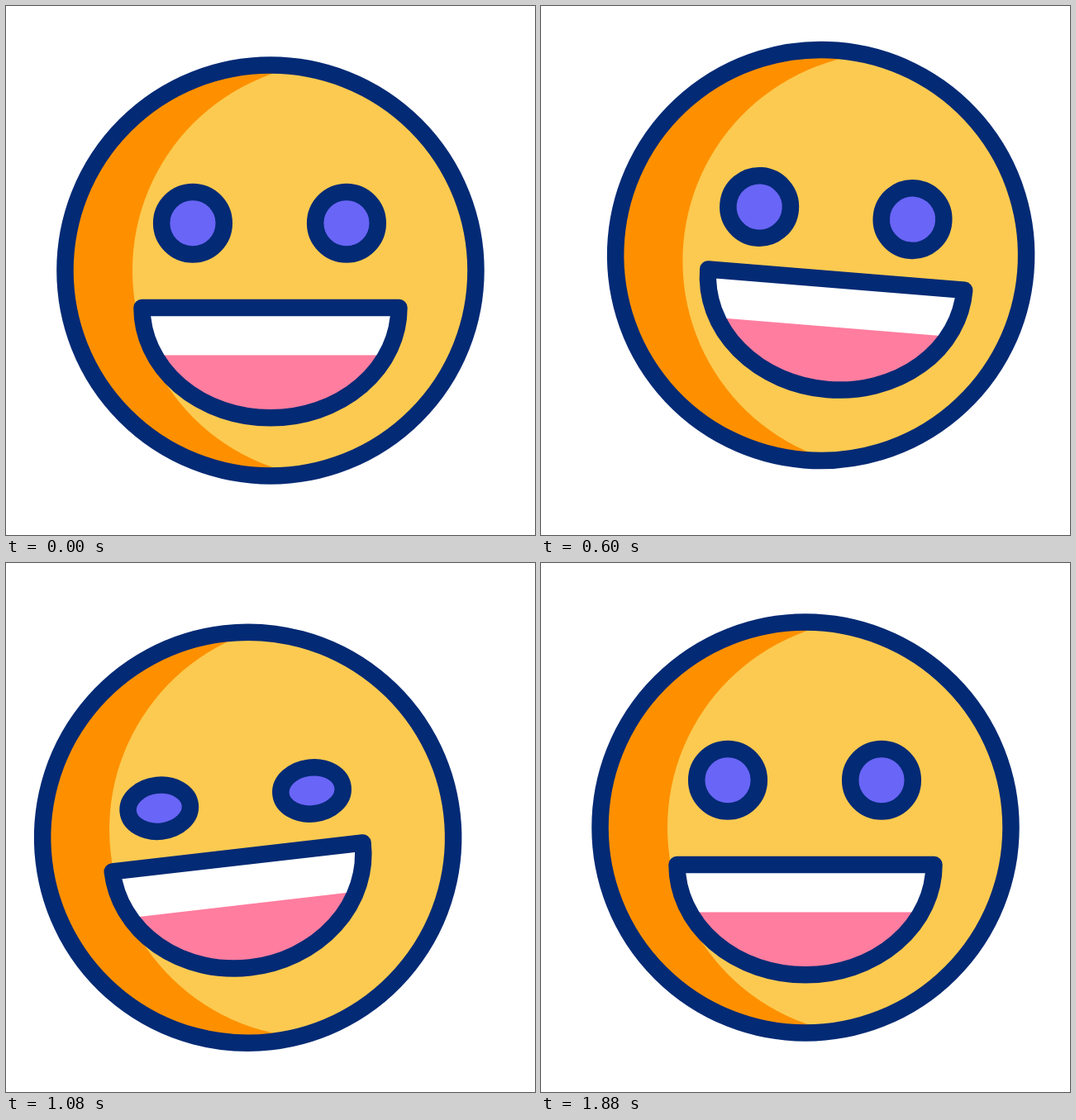
These frames come from a looping animation (640 by 640 pixels, 2000 ms). An HTML page with a canvas:

```html
<!DOCTYPE html>
<html>
<head>
<meta charset="utf-8">
<style>
html, body { margin: 0; width: 100%; height: 100%; overflow: hidden; background: #fff; }
canvas { display: block; width: 100vmin; height: 100vmin; }
</style>
</head>
<body>
<canvas id="stage" width="640" height="640"></canvas>
<script>
const ctx = document.getElementById('stage').getContext('2d');
const NAVY = '#032a75', YELLOW = '#fcca50', ORANGE = '#fe9000';
const PURPLE = '#6965f7', PINK = '#ff7d9f';
const LOOP = 2000, STEP = 40, LAST = 1880;
const HEAD_R = 248.5, EYE_R = 37.8;

// Rest, lean down, toss up, lean down, recoil, rest.
const BEATS = [0, 333, 667, 1095, 1500, 1770];

function ease(u) {
  u = Math.max(0, Math.min(1, u));
  return u * u * (3 - 2 * u);
}

// Offset from rest, moving through the beats; a lag makes a part trail the head.
function swing(t, lag, down, up, downAgain, recoil = 0) {
  const poses = [0, down, up, downAgain, recoil, 0];
  return poses.slice(1).reduce((value, pose, i) => {
    const u = (t - lag - BEATS[i]) / (BEATS[i + 1] - BEATS[i]);
    return value + (pose - poses[i]) * ease(u);
  }, 0);
}

// Rises to 1 around mid and falls back to 0 at a distance of half.
function pulse(t, mid, half, fade) {
  return ease((half - Math.abs(t - mid)) / fade);
}

function circle(x, y, r, color) {
  ctx.beginPath();
  ctx.arc(x, y, r, 0, 2 * Math.PI);
  ctx.fillStyle = color;
  ctx.fill();
}

function drawHead() {
  circle(0, 0, HEAD_R, ORANGE);
  ctx.save();
  ctx.clip();
  circle(85, 0, 252, YELLOW);
  ctx.restore();
  ctx.beginPath();
  ctx.arc(0, 0, HEAD_R, 0, 2 * Math.PI);
  ctx.stroke();
}

function drawEye(x, y, open) {
  ctx.beginPath();
  if (open < 0.03) {
    ctx.moveTo(x - EYE_R, y);
    ctx.lineTo(x + EYE_R, y);
  } else {
    ctx.ellipse(x, y, EYE_R, EYE_R * open, 0, 0, 2 * Math.PI);
    ctx.fillStyle = PURPLE;
    ctx.fill();
  }
  ctx.stroke();
}

function drawMouth(x, y, w, h) {
  const shape = new Path2D();
  shape.ellipse(x, y, w, h, 0, 0, Math.PI);
  shape.closePath();
  ctx.save();
  ctx.clip(shape);
  ctx.fillStyle = '#fff';
  ctx.fillRect(x - w, y, 2 * w, h);
  ctx.fillStyle = PINK;
  ctx.fillRect(x - w, y + h * 0.431, 2 * w, h);
  ctx.restore();
  ctx.stroke(shape);
}

function draw(t) {
  ctx.fillStyle = '#fff';
  ctx.fillRect(0, 0, 640, 640);
  ctx.save();
  ctx.strokeStyle = NAVY;
  ctx.lineWidth = 20.5;
  ctx.lineCap = ctx.lineJoin = 'round';
  ctx.translate(320 + swing(t, -8, -24.2, 22.5, -27.4), 320 + swing(t, 6, 43.8, -27.2, 12.5));
  ctx.rotate(swing(t, 40, -27.6, 15, -7.6, 3.6) * Math.PI / 180);
  drawHead();

  const eyeX = swing(t, 90, -36.8, 58.2, -20.5, -4.5);
  const eyeY = swing(t, 90, 11.1, 0, 11.5, 2) - 57.3;
  const open = 1 - pulse(t, 1240, 200, 120);
  drawEye(eyeX - 94, eyeY, open);
  drawEye(eyeX + 92, eyeY, open);

  const grin = pulse(t, 420, 180, 160), chuckle = pulse(t, 920, 220, 200);
  drawMouth(
    swing(t, 60, -18.1, 39.7, -20, -1.3),
    swing(t, 110, -23, -9.8, -26.3, 0.6) + 45,
    155.5 - 2.5 * grin - 14.2 * chuckle,
    133.3 + 7 * grin + 5 * chuckle
  );
  ctx.restore();
}

function tick() {
  const t = performance.now() % LOOP;
  draw(Math.min(LAST, Math.floor(t / STEP) * STEP));
  requestAnimationFrame(tick);
}
tick();
</script>
</body>
</html>
```
